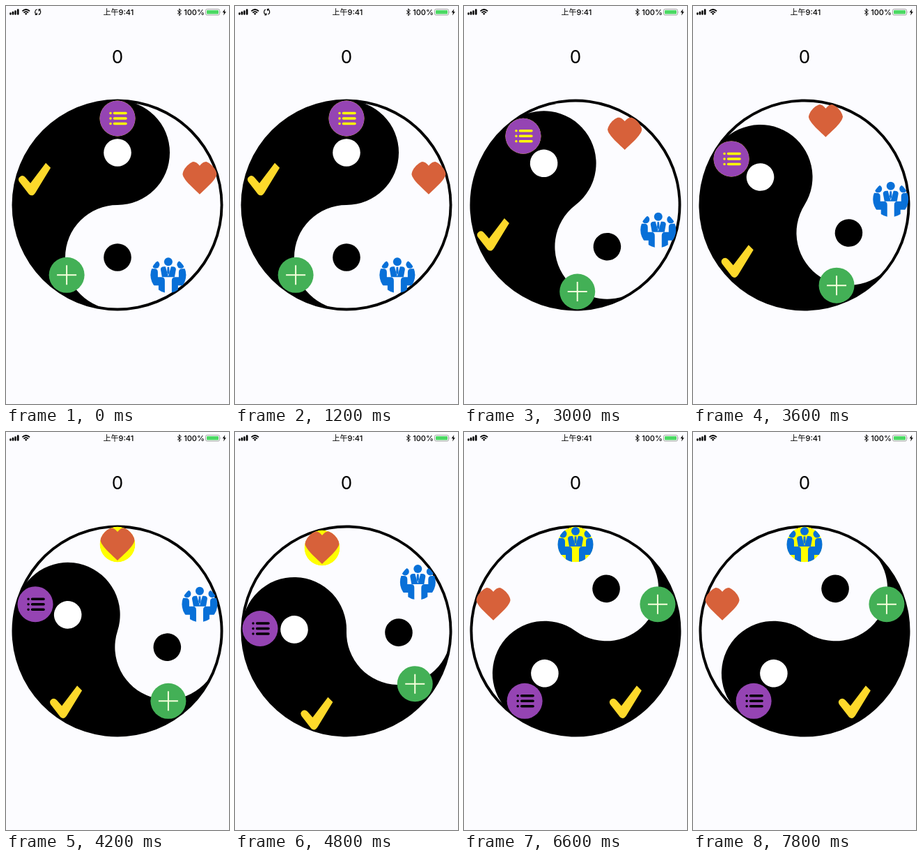
An HTML page for the animation above (8 s loop, 320 by 570 pixels).

```html
<!DOCTYPE html>
<html lang="zh">
<head>
<meta charset="utf-8">
<title>Rotating menu</title>
<style>
  html, body { margin: 0; width: 100%; height: 100%; overflow: hidden; background: #fcfcff; }
  svg { display: block; width: 100vw; height: 100vh; }
  text { font-family: Inter, "Noto Sans CJK SC", "Noto Sans CJK", sans-serif; text-anchor: middle; }
  .bar { font-size: 11px; font-weight: 500; }
  .halo { fill: #ff0; visibility: hidden; }
  .selected .halo { visibility: visible; }
  .lines { stroke: #000; fill: #000; stroke-width: 3.5; stroke-linecap: round; }
  .selected .lines { stroke: #ff0; fill: #ff0; }
</style>
</head>
<body>
<svg viewBox="0 0 320 570">
  <defs>
    <clipPath id="face"><circle r="147.6"/></clipPath>
    <clipPath id="round"><circle r="25.5"/></clipPath>
    <g id="sitter">
      <circle cx="-18" cy="-15" r="5.5"/>
      <path d="M-27-9H-20Q-15-9-15-4V3H-10Q-5 3-5 8V26H-14V15H-27Z"/>
    </g>
  </defs>
  <rect width="320" height="570" fill="#fcfcff"/>

  <!-- status bar -->
  <g>
    <path d="M6.5 10.5v1M10 9v2.5M13.5 7.5v4M17.2 5.5v6" stroke="#000" stroke-width="2.6" stroke-linecap="round"/>
    <g fill="none" stroke="#000" stroke-width="1.8">
      <path d="M23.4 7.4Q28.7 2.6 34 7.4M25.4 9.6Q28.7 6.6 32 9.6"/>
      <path d="M28.7 13l-1.8-2.2q1.8-1.4 3.6 0z" fill="#000" stroke="none"/>
    </g>
    <g id="sync" fill="none" stroke="#000" stroke-width="1.1">
      <path d="M-1-3.8A3.9 3.9 0 0 0-2 3.4M1 3.8A3.9 3.9 0 0 0 2-3.4"/>
      <path d="M-4 3.8H-1.4V1.2M4-3.8H1.4V-1.2"/>
    </g>
    <text class="bar" x="161.5" y="12.7">上午9:41</text>
    <path d="M246 6.3l5.4 4.8-2.7 2.6V4l2.7 2.6-5.4 4.8" fill="none" stroke="#000"/>
    <text class="bar" x="270" y="12.7" textLength="">100%</text>
    <rect x="286.5" y="4.5" width="20" height="8.5" rx="2" fill="none" stroke="#999" stroke-width=".9"/>
    <rect x="288" y="6" width="17" height="5.5" rx=".8" fill="#4cd964"/>
    <path d="M307.8 7.2q1.4 1.5 0 3z" fill="#999"/>
    <path d="M314.3 4.2l-3.6 5h2.3l-.9 4.2 3.7-5.2h-2.3z"/>
  </g>

  <text x="160" y="82" font-size="26">0</text>

  <g transform="translate(160 285)">
    <g id="disc">
      <circle r="151.5"/>
      <path d="M0-150A150 150 0 0 1 0 150A75 75 0 0 1 0 0A75 75 0 0 0 0-150Z" fill="#fcfcff" clip-path="url(#face)"/>
      <circle cy="-75" r="19.8" fill="#fff"/>
      <circle cy="75" r="19.8"/>
    </g>

    <g class="item">
      <circle class="halo" r="25.5"/>
      <circle r="25.5" fill="#9544b3"/>
      <path class="lines" d="M-4.5-7.5H12M-4.5 0H12M-4.5 7.5H12M-10-7.5h.01M-10 0h.01M-10 7.5h.01"/>
    </g>
    <g class="item" clip-path="url(#round)">
      <circle class="halo" r="25.5"/>
      <path d="M0-18C5-25 13-25 18-21C25-16 27-7 22 0C17 8 8 15 0 23C-8 15-17 8-22 0C-27-7-25-16-18-21C-13-25-5-25 0-18Z" fill="#d7613a"/>
    </g>
    <g class="item" clip-path="url(#round)">
      <circle class="halo" r="25.5"/>
      <g fill="#0870d8">
        <use href="#sitter"/>
        <use href="#sitter" transform="scale(-1 1)"/>
        <circle cy="-19" r="6"/>
        <path fill-rule="evenodd" d="M-11-8Q-11-12-6-12H6Q11-12 11-8L9 3H-9ZM-4-12L0 2L4-12Z"/>
        <path d="M-1.3-11.5H1.3L1.7-4L0 0L-1.7-4Z"/>
      </g>
    </g>
    <g class="item">
      <circle class="halo" r="25.5"/>
      <circle r="25.5" fill="#43b056"/>
      <path d="M-14 0H14M0-14V14" stroke="#f6ffdc" stroke-width="2"/>
    </g>
    <g class="item">
      <circle class="halo" r="25.5"/>
      <path d="M15-22L22-15L0 21Q-4 27-9 23L-23 5Q-26 0-21-3Q-17-5-14-1L-7 7Z" fill="#fdd92b"/>
    </g>
  </g>
</svg>
<script>
  const LOOP = 8000, STEP = 200, ORBIT = 124, SLOT = 72;
  // [time in ms, disc angle in degrees]
  const turn = [
    [0, 0], [1300, 0], [1600, -1.8], [2000, -7.2], [2400, -17], [2800, -30],
    [3200, -44.5], [3600, -57.8], [3800, -64.5], [4000, -71], [4200, -72],
    [4400, -73], [4600, -78], [4800, -88.4], [5000, -103], [5200, -120],
    [5400, -134], [5600, -141.7], [5800, -143.4], [6000, -144], [LOOP, -144]
  ];
  const disc = document.getElementById('disc');
  const sync = document.getElementById('sync');
  const items = [...document.querySelectorAll('.item')];

  function angleAt(time) {
    const next = turn.findIndex(([t]) => t > time);
    const [t0, a0] = turn[next - 1], [t1, a1] = turn[next];
    return a0 + (a1 - a0) * (time - t0) / (t1 - t0);
  }

  function draw(time) {
    const angle = angleAt(time);
    const selected = time < 4200 ? 0 : time < 6000 ? 1 : 2;
    disc.setAttribute('transform', `rotate(${angle})`);
    items.forEach((item, i) => {
      const a = (angle + i * SLOT) * Math.PI / 180;
      item.setAttribute('transform', `translate(${ORBIT * Math.sin(a)} ${-ORBIT * Math.cos(a)})`);
      item.classList.toggle('selected', i === selected);
    });
    sync.setAttribute('transform', `translate(45.7 8.6) rotate(${time * 0.14})`);
    sync.style.display = time < 2400 ? '' : 'none';
  }

  const start = performance.now();
  function tick() {
    const time = (performance.now() - start) % LOOP;
    draw(Math.floor(time / STEP) * STEP);
    requestAnimationFrame(tick);
  }
  tick();
</script>
</body>
</html>
```
